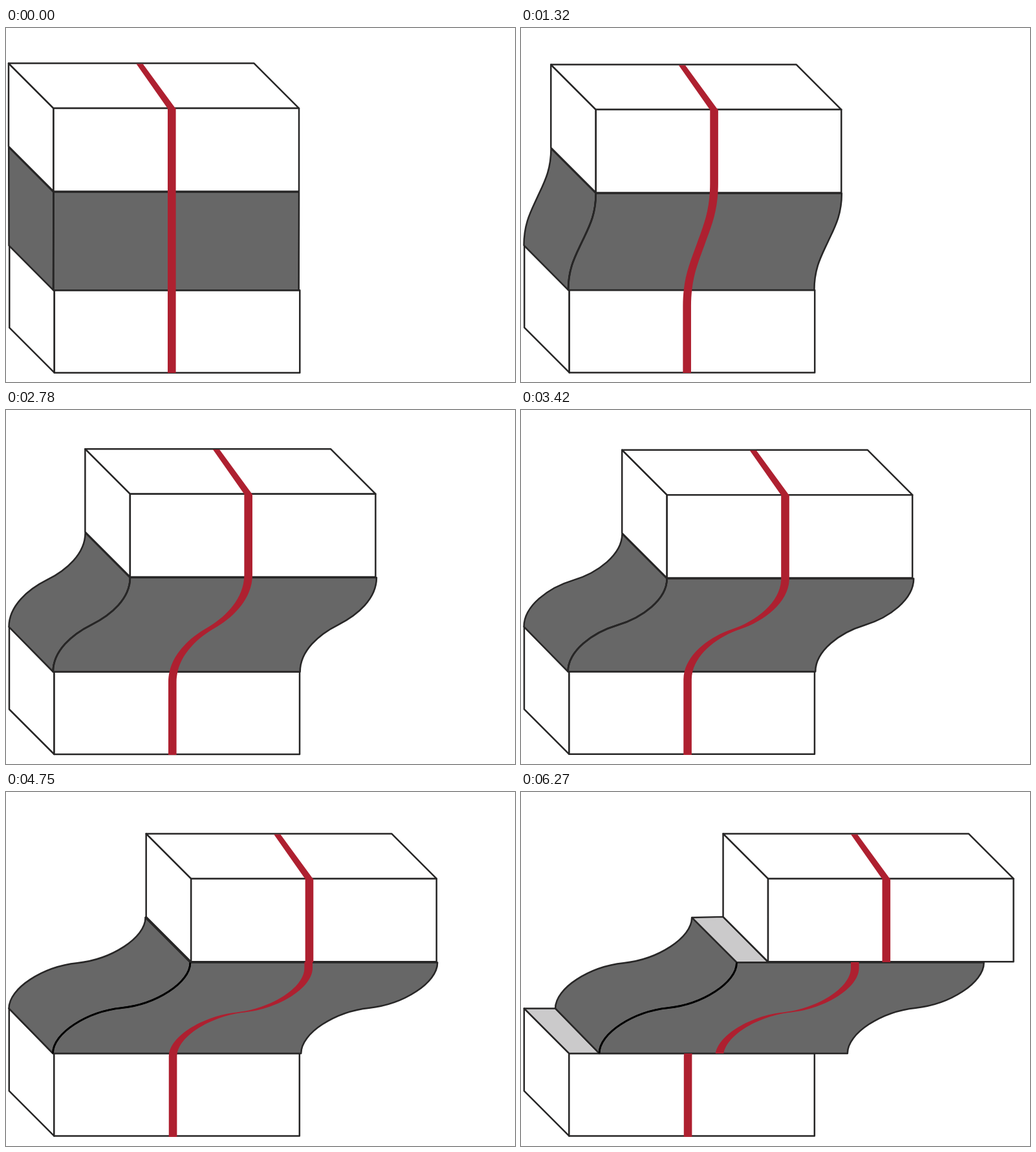
Animation, 787 px wide and 547 px high, one loop 6.93 s. Source, as an HTML page with a canvas:

```html
<!DOCTYPE html>
<html>
<head>
<meta charset="utf-8">
<style>
html, body { margin: 0; height: 100%; overflow: hidden; background: #fff; }
canvas { display: block; }
</style>
</head>
<body>
<canvas id="stage" width="787" height="547"></canvas>
<script>
const ctx = document.getElementById('stage').getContext('2d');
const LOOP = 6930, SHEAR_STEPS = 25;
const INK = '#272626', DARK = '#676767', LIGHT = '#cbcacb', RED = '#ae2030';
const stepTimes = [660, 790, 990, 1120, 1320, 1450, 1580, 1780, 1910, 2110, 2240, 2460,
  2580, 2780, 2910, 3090, 3290, 3420, 3620, 3750, 3950, 4080, 4280, 4410, 4610, 4750,
  4950, 5080, 5280, 5410, 5610, 5740, 5940, 6070, 6270];

function paint(path, fill, stroke, width = 2.5) {
  if (fill) { ctx.fillStyle = fill; ctx.fill(path); }
  if (stroke) { ctx.strokeStyle = stroke; ctx.lineWidth = width; ctx.stroke(path); }
}

function poly(points, fill, stroke) {
  const path = new Path2D();
  points.forEach(p => path.lineTo(...p));
  path.closePath();
  paint(path, fill, stroke);
}

// S-shaped edge from a to b: vertical at both ends, flatter in the middle as shear grows
function sCurve(path, [ax, ay], [bx, by], n) {
  const h = by - ay, mx = (ax + bx) / 2, my = (ay + by) / 2;
  const hx = (bx - ax) / 4, hy = h * (0.18 - 0.0056 * n), end = h * 0.225;
  path.bezierCurveTo(ax, ay + end, mx - hx, my - hy, mx, my);
  path.bezierCurveTo(mx + hx, my + hy, bx, by - end, bx, by);
}

function sheet(a, b, c, d, n) {
  const path = new Path2D();
  path.moveTo(...a);
  path.lineTo(...b);
  sCurve(path, b, c, n);
  path.lineTo(...d);
  sCurve(path, d, a, n);
  path.closePath();
  paint(path, DARK, INK);
}

function block(x, y, h, withTop) {
  const w = 379.5, d = 69.5;
  poly([[x, y], [x + d, y + d], [x + d, y + d + h], [x, y + h]], '#fff', INK);
  if (withTop) poly([[x, y], [x + w, y], [x + w + d, y + d], [x + d, y + d]], '#fff', INK);
  poly([[x + d, y + d], [x + d + w, y + d], [x + d + w, y + d + h], [x + d, y + d + h]], '#fff', INK);
}

function stripe(n, dx, shift, top, bottom) {
  const w = 12.6, xt = 250 + dx, xb = 250 + 0.07 * n;
  const yt = 232 + 1.6 * n, yb = 435 - 1.05 * n;
  const path = new Path2D();
  path.moveTo(xt, 124);
  path.lineTo(xt, yt);
  sCurve(path, [xt, yt], [xb, yb], n);
  path.lineTo(xb, 533);
  path.lineTo(xb + w, 533);
  path.lineTo(xb + w, yb);
  sCurve(path, [xb + w, yb], [xt + w, yt], n);
  path.lineTo(xt + w, 124);
  ctx.save();
  ctx.beginPath();
  ctx.rect(0, top, 787, bottom - top);
  ctx.clip();
  ctx.translate(shift, 0);
  paint(path, RED);
  ctx.restore();
}

function draw(step) {
  const n = Math.min(step, SHEAR_STEPS);
  const split = step > SHEAR_STEPS, k = split ? step - SHEAR_STEPS - 1 : 0;
  const dx = 8.455 * n, dy = 0.395 * n;
  const mid = 5.4 * k, slide = split ? 1.3 + 10.65 * k : 0;
  const topX = 4 + dx + slide, lowX = 5.3 - 0.02 * n;
  const lowY = 405.2 - 0.05 * n, backY = 336.2 - 0.07 * n;

  ctx.clearRect(0, 0, 787, 547);
  ctx.lineJoin = 'round';
  block(lowX, lowY - 69.5, 127.5, false);

  const backTop = [4.2 + dx + mid, 184.2 + dy], frontTop = [73.5 + dx + mid, 253.5 + dy];
  const backLow = [4.5 + mid, backY], frontLow = [73.2 - 0.03 * n + mid, lowY];
  if (split) {
    poly([backTop, [topX, 183 + dy], [topX + 69.5, 253 + dy], frontTop], LIGHT, INK);
    poly([[lowX, backY], backLow, frontLow, [lowX + 69.5, lowY]], LIGHT, INK);
  }
  sheet(backTop, frontTop, frontLow, backLow, n);
  sheet(frontTop, [453 + dx + 0.11 * n + mid, 253.5 + dy],
    [452.7 + 0.14 * n + mid, lowY], frontLow, n);
  const fold = new Path2D();
  fold.moveTo(...frontTop);
  sCurve(fold, frontTop, frontLow, n);
  paint(fold, null, split ? '#000' : INK, 2.8);

  block(topX, 54.6 + dy, 128.3, true);

  const s = dx + slide;
  poly([[201.5 + s, 55.5 + dy], [211.7 + s, 55.5 + dy], [262.6 + s, 125 + dy], [250.3 + s, 125 + dy]], RED);
  stripe(n, dx, slide, Math.round(124 + dy), 263);
  stripe(n, dx, mid, 263, 404);
  stripe(n, dx, 0, 404, 534);
}

function tick() {
  const t = performance.now() % LOOP;
  draw(stepTimes.filter(at => at <= t).length);
  requestAnimationFrame(tick);
}
tick();
</script>
</body>
</html>
```
